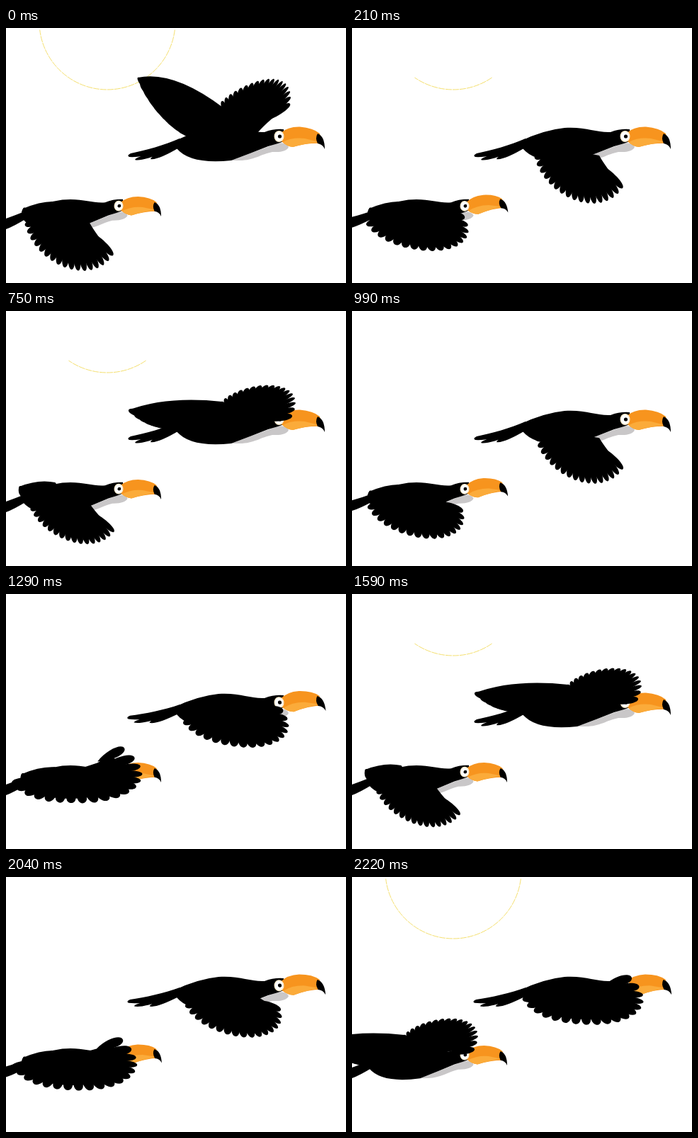
Recreate the animation shown at these times as an HTML page with a canvas. Size 480 px wide and 360 px high, loop 2250 ms.

```html
<!DOCTYPE html>
<html lang="en">
<head>
<meta charset="utf-8">
<title>Two toucans in flight</title>
<style>
html, body { margin: 0; width: 100%; height: 100%; overflow: hidden; background: #fff; }
canvas { display: block; width: 480px; height: 360px; }
</style>
</head>
<body>
<canvas id="stage" width="480" height="360"></canvas>
<script>
const ctx = document.getElementById('stage').getContext('2d');
const LOOP = 2250, FLAP = 840, STEP = 30, TAU = 2 * Math.PI;

// A wing is a Bezier curve through its feather tips (inner to outer) plus its front root.
const FOLDED = [262,172, 252,168, 252,166, 255,160, 300,150];
const RAISED = {
  at: 0, ease: k => 1 - (1 - k) ** 3,
  near: [305,103, 335,75, 410,48, 401,107, 356,147],
  far: [266,147, 235,140, 198,100, 186,70, 306,112]
};
const LOWERED = {
  at: 210, ease: k => k,
  near: [256,173, 262,235, 350,275, 382,226, 349,180],
  far: FOLDED
};
const FORWARD = {
  at: 620, ease: k => k ** 3,
  near: [237,173, 270,228, 500,205, 398,122, 360,143],
  far: FOLDED
};
const LIFTING = {
  at: 750, ease: k => k,
  near: [304,128, 330,100, 432,88, 404,148, 375,150],
  far: [242,170, 222,158, 205,170, 173,140, 305,128]
};
const CYCLE = [RAISED, LOWERED, FORWARD, LIFTING, { ...RAISED, at: FLAP }];

const NEAR_WING = { part: 'near', count: 18, fan: [322, 160], hub: [285, 168], bow: .2 };
const FAR_WING = { part: 'far', count: 12, fan: [270, 170], hub: [315, 168], bow: -.4 };

const BIRDS = [
  { lag: 0, shift: [0, 0], body: [1, 0, 0, 1, 0, 0] },
  { lag: 210, shift: [-231, 95], body: [.93, -.028, 0, .92, -199.5, 121.2] }
];

const BODY = new Path2D('M237 160Q270 144 300 141C330 139 345 148 365 147Q378 142 392 143V160Q385 163 370 167Q345 177 318 187Q260 193 241 170Z');
const BELLY = new Path2D('M318 187Q345 177 385 162Q397 162 399 168Q396 176 376 175C360 178 350 187 330 187Z');
const TAIL = new Path2D('M245 156C225 165 196 173 176 177Q170 180 174 182Q190 183 214 176Q184 181 182 186Q190 189 228 174Q205 180 204 185Q214 187 246 168Z');
const BEAK = new Path2D('M388 148Q398 139 415 139.5Q434 141 443 149L446 163Q425 162 405 168Q396 167 389 160Z');
const UNDER = new Path2D('M391 161Q404 154 422 156L442 161Q422 163 405 168Q396 167 391 161Z');
const TIP = new Path2D('M440 149Q450 153 450 171Q447 164 440 163Q436 155 440 149Z');

const mix = (a, b, k) => a + (b - a) * k;
const blend = (a, b, k) => a.map((v, i) => mix(v, b[i], k));

function wingShape(part, t) {
  const i = CYCLE.findLastIndex(pose => pose.at <= t);
  const a = CYCLE[i], b = CYCLE[i + 1];
  return blend(a[part], b[part], a.ease((t - a.at) / (b.at - a.at)));
}

function bezier(p, u) {
  const v = 1 - u;
  return [0, 1].map(n =>
    v ** 3 * p[n] + 3 * v * v * u * p[n + 2] + 3 * v * u * u * p[n + 4] + u ** 3 * p[n + 6]);
}

function feather([rx, ry], [tx, ty], w) {
  const dx = tx - rx, dy = ty - ry, len = Math.hypot(dx, dy) || 1;
  const nx = -dy / len * w, ny = dx / len * w;
  ctx.beginPath();
  ctx.moveTo(rx, ry);
  ctx.bezierCurveTo(rx + dx * .5 - nx * 1.3, ry + dy * .5 - ny * 1.3, tx - nx, ty - ny, tx, ty);
  ctx.bezierCurveTo(tx + nx, ty + ny, rx + dx * .5 + nx * 1.3, ry + dy * .5 + ny * 1.3, rx, ry);
  ctx.fill();
}

function drawWing({ part, count, fan, hub, bow }, t) {
  const p = wingShape(part, t), end = p.slice(6, 8), front = p.slice(8);
  const tips = Array.from({ length: count }, (_, i) => bezier(p, i / (count - 1)));
  const edge = blend(blend(front, end, .5), fan, bow);
  ctx.fillStyle = '#000';
  ctx.beginPath();
  ctx.moveTo(...front);
  ctx.quadraticCurveTo(...edge, ...end);
  for (let i = count - 1; i >= 0; i--) {
    ctx.lineTo(...blend(tips[i], fan, mix(.09, .27, i / count)));
  }
  ctx.lineTo(...hub);
  ctx.fill();
  tips.forEach((tip, i) => {
    const [x, y] = tips[i ? i - 1 : 1];
    const gap = Math.hypot(tip[0] - x, tip[1] - y);
    feather(blend(tip, fan, .5), tip, Math.min(7.5, Math.max(3.5, gap * .55)));
  });
}

function layer(prepare, draw) {
  ctx.save();
  prepare();
  draw();
  ctx.restore();
}

function turnAbout(x, y, angle) {
  ctx.translate(x, y);
  ctx.rotate(angle);
  ctx.translate(-x, -y);
}

function paint(path, color) {
  ctx.fillStyle = color;
  ctx.fill(path);
}

function disc(x, y, rx, ry, color) {
  ctx.fillStyle = color;
  ctx.beginPath();
  ctx.ellipse(x, y, rx, ry, 0, 0, TAU);
  ctx.fill();
}

function head() {
  paint(BEAK, '#f7941e');
  paint(UNDER, '#fbab3a');
  paint(TIP, '#000');
  disc(385.5, 153, 7, 8, '#fdeed0');
  disc(385.5, 153, 5.5, 6.5, '#fff');
  disc(386.5, 153, 2.6, 2.6, '#000');
}

function bird({ lag, shift, body }, time) {
  const t = (time + lag) % FLAP;
  const tilt = 6 * Math.max(0, Math.cos((t - 450) / FLAP * TAU));
  const flap = wing => layer(() => ctx.translate(...shift), () => drawWing(wing, t));
  flap(FAR_WING);
  layer(() => ctx.transform(...body), () => {
    paint(BELLY, '#c9c7c8');
    layer(() => turnAbout(245, 162, tilt / 80), () => paint(TAIL, '#000'));
    paint(BODY, '#000');
    layer(() => turnAbout(388, 153, -tilt / 62), head);
  });
  flap(NEAR_WING);
}

// The sun's pale rim shows in glimpses that open and close around its lowest point.
function sun(t) {
  const open = 1.45 * Math.sqrt(Math.max(0, Math.cos(t / 270 * TAU)));
  if (!open) return;
  ctx.strokeStyle = '#f5e070';
  ctx.lineWidth = 1;
  ctx.setLineDash([9, 1]);
  ctx.beginPath();
  ctx.arc(143, -9, 96, TAU / 4 - open, TAU / 4 + open);
  ctx.stroke();
}

function frame(now) {
  const t = Math.floor(now % LOOP / STEP) * STEP % FLAP;
  ctx.fillStyle = '#fff';
  ctx.fillRect(0, 0, 480, 360);
  sun(t);
  for (const b of BIRDS) bird(b, t);
}

let start;
function tick(now) {
  start ??= now;
  frame(Math.max(0, now - start));
  requestAnimationFrame(tick);
}
frame(0);
requestAnimationFrame(tick);
</script>
</body>
</html>
```
